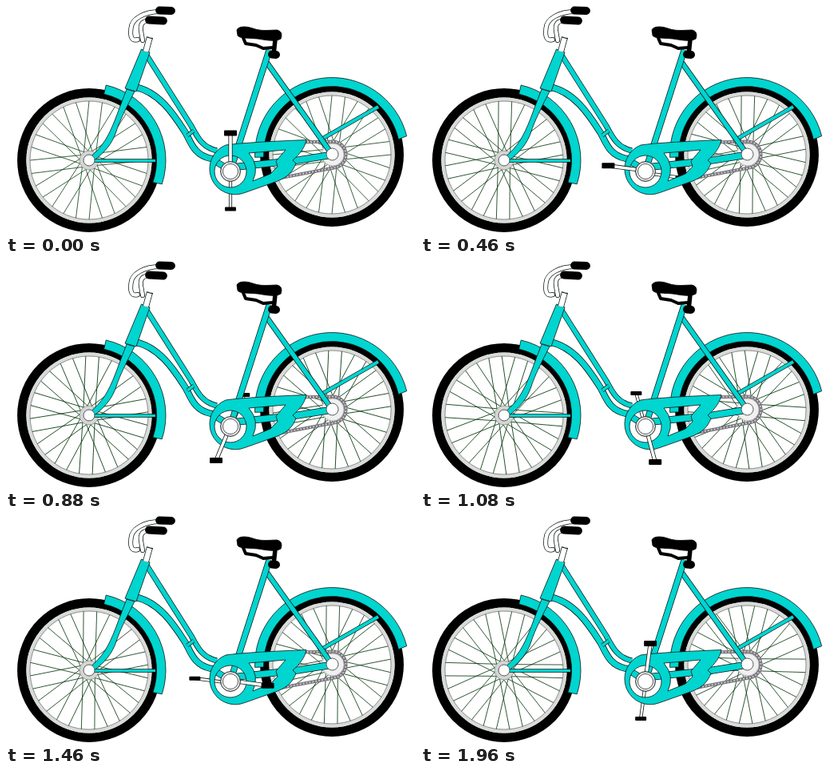
An HTML page for the animation above (2 s loop, 512 px wide and 284 px high).

```html
<!DOCTYPE html>
<html lang="en">
<head>
<meta charset="utf-8">
<title>Bicycle</title>
<style>
  html, body { margin: 0; width: 100%; height: 100%; overflow: hidden; background: #fff; }
  svg { display: block; width: 512px; height: 284px; }
</style>
</head>
<body>
<svg id="stage" viewBox="0 0 512 284" fill="none"></svg>
<script>
const TEAL = '#00d5d0', INK = '#0a1414', RIM = '#d9dbd9';
const FRAMES = 48, LOOP = 2000;
const stage = document.getElementById('stage');

function add(parent, tag, attrs) {
  const el = document.createElementNS('http://www.w3.org/2000/svg', tag);
  for (const key in attrs) el.setAttribute(key, attrs[key]);
  parent.appendChild(el);
  return el;
}
const group = () => add(stage, 'g', {});
const circle = (p, cx, cy, r, fill, stroke, width = 1) =>
  add(p, 'circle', { cx, cy, r, fill, stroke: stroke || 'none', 'stroke-width': width });
const shape = (p, d, fill, stroke = INK) =>
  add(p, 'path', { d, fill, stroke, 'stroke-width': 0.8, 'fill-rule': 'evenodd', 'stroke-linejoin': 'round' });
const line = (p, d, stroke, width, cap = 'butt') =>
  add(p, 'path', { d, stroke, 'stroke-width': width, 'stroke-linecap': cap, 'stroke-linejoin': 'round' });

// An outlined tube: dark stroke under a narrower coloured one.
function tube(p, d, width, color = TEAL, cap = 'butt') {
  line(p, d, INK, width, cap);
  line(p, d, color, width - 1.5, cap);
}

function polar(cx, cy, r, deg) {
  const a = deg * Math.PI / 180;
  return (cx + r * Math.cos(a)).toFixed(2) + ' ' + (cy + r * Math.sin(a)).toFixed(2);
}

function fender(cx, cy, inner, outer, from, to) {
  const large = to - from > 180 ? 1 : 0;
  shape(stage, `M${polar(cx, cy, outer, from)}A${outer} ${outer} 0 ${large} 1 ${polar(cx, cy, outer, to)}
    L${polar(cx, cy, inner, to + 1)}A${inner} ${inner} 0 ${large} 0 ${polar(cx, cy, inner, from)}Z`, TEAL);
}

function wheel(cx, cy) {
  circle(stage, cx, cy, 84.2, 'none', '#000', 11.4);
  circle(stage, cx, cy, 76.3, 'none', RIM, 4.6);
  circle(stage, cx, cy, 74, 'none', '#6f7472', 0.8);
  const spin = group();
  spin.setAttribute('shape-rendering', 'crispEdges');
  const count = 28;
  let d = '';
  for (let i = 0; i < count; i++) {
    const a = i * 360 / count - 90;
    d += `M${polar(cx, cy, 9, a + (i % 2 ? 50 : -50))}L${polar(cx, cy, 74, a)}`;
  }
  line(spin, d, '#0a3a10', 0.8);
  circle(stage, cx, cy, 12, '#d4d6d4', '#8b8f8d', 0.8);
  return deg => spin.setAttribute('transform', `rotate(${deg} ${cx} ${cy})`);
}

function crank(cy, reach, width, pedalW, pedalH) {
  const cx = 281, g = group();
  const edge = line(g, '', INK, width + 1.6), core = line(g, '', '#fff', width);
  const pedal = add(g, 'rect', { width: pedalW, height: pedalH, rx: 1, fill: '#000' });
  return deg => {
    const a = deg * Math.PI / 180;
    const x = cx + reach * Math.sin(a), y = cy - reach * Math.cos(a);
    const d = `M${cx} ${cy}L${x.toFixed(2)} ${y.toFixed(2)}`;
    edge.setAttribute('d', d);
    core.setAttribute('d', d);
    pedal.setAttribute('x', x - pedalW / 2);
    pedal.setAttribute('y', y - pedalH / 2);
  };
}

const turnFront = wheel(104, 193);
const turnRear = wheel(408, 186);
fender(103.5, 193, 85, 96.5, -77, 18);
fender(408, 186, 85.5, 96.5, 178, 346);

// Chain and rear sprocket
circle(stage, 409, 186, 14, '#f0f0f0', '#a5a2a8', 0.8);
const chainPath = 'M328 218L413 202A16.5 16.5 0 0 0 409 169.5L365 170.5';
line(stage, chainPath, '#77737a', 4.2);
const links = line(stage, chainPath, '#d0ccd2', 1.8);
links.setAttribute('stroke-dasharray', '2 2');

const turnFar = crank(209, 45, 2.6, 14, 5);

// Frame
tube(stage, 'M107 193.5H187', 4.4);
tube(stage, 'M396 166L466 126', 5.4);
tube(stage, 'M281 202L365 193L406 186.5', 9);
tube(stage, 'M326 70L407 184', 7);
tube(stage, 'M329.5 55L281 206', 8);
tube(stage, 'M160 101C193 107 212 139 225 159C232 172 236 187 257 191L281 206', 8.4);
tube(stage, 'M175 60L232 150C240 165 246 177 264 181', 7);
tube(stage, 'M227 162L235 156', 5);
shape(stage, `M151 104L137 141C128 164 121 176 104 190L109 194C124 183 133 172 138 157
  C142 145 147 134 161 107Z`, TEAL);
shape(stage, 'M169.5 54L180 58L163 107L149 103Z', TEAL);

// Chain guard, open around the crank axle and over the chain stay
shape(stage, `M275 174C295 171 340 169 376 167.5C374 177 369 184 359 193L363 197C359 207 353 214 340 219
  L299 233.5A31.5 31.5 0 1 1 275 174Z
  M261 207A20 20 0 1 0 301 207A20 20 0 1 0 261 207Z
  M304 184L350 180L338 194L340 201L331 210L309 219Q318 200 304 184Z`, TEAL);

const turnNear = crank(206, 47, 3.6, 16, 7);
circle(stage, 281, 207, 12.4, '#e4e6e4', INK, 0.9);
circle(stage, 281, 207, 9.5, '#fff', '#4a4f4d', 0.9);

// Axles
circle(stage, 104, 193, 7, '#fff', '#555b58');
circle(stage, 408.5, 185.5, 7.5, '#fff', '#555b58');

// Handlebar
tube(stage, 'M175 57L180 39', 8, '#fff');
line(stage, 'M176.5 39L184 41', INK, 1);
tube(stage, 'M193 7C173 7 157 16 156.5 28C155 40 158 44 165 42', 6, '#fff', 'round');
tube(stage, 'M182 18C170 18 168 23 169 31L171 43', 6, '#fff', 'round');
line(stage, 'M192 5.5L207 6', '#000', 9.8, 'round');
line(stage, 'M179 17.5L197 18.5', '#000', 9.8, 'round');

// Saddle
shape(stage, `M289 30C291 25 301 25 309 28C320 32 330 30 339 30C345 31 346 36 344 41
  C338 45 327 43 315 41C305 40 293 41 290 37Z`, '#000', '#000');
line(stage, 'M297 40L300 47L313 49L322 53L334 52', '#000', 4, 'round');
line(stage, 'M337 42L335 61', '#000', 5.5, 'round');
line(stage, 'M333 60.5L338 61', '#000', 10, 'round');

// Steps fall on a 24 per second grid, rounded to 10 ms.
function draw() {
  const t = performance.now() % LOOP;
  const step = Math.ceil((Math.floor(t / 10) + 0.5) * 0.24 - 1e-9) - 1;
  const deg = -360 * step / FRAMES;
  turnFront(deg);
  turnRear(deg);
  turnNear(deg);
  turnFar(deg + 180);
  links.setAttribute('stroke-dashoffset', -44 * 4 * step / FRAMES);
  requestAnimationFrame(draw);
}
draw();
</script>
</body>
</html>
```
